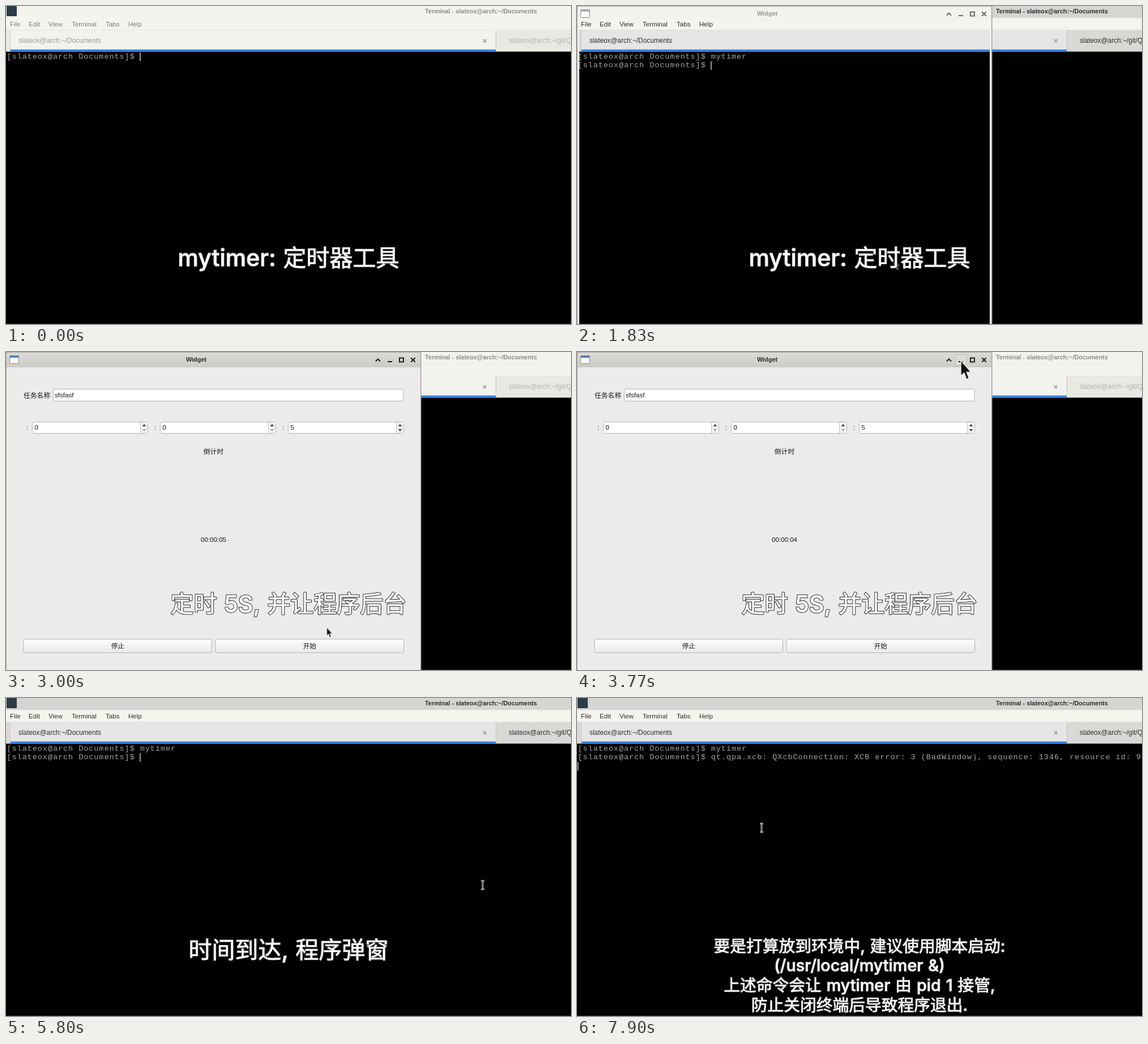
Write an HTML page with a canvas that moves like this. It is 998 by 561 pixels and loops after 8 s.

```html
<!DOCTYPE html>
<html lang="zh">
<head>
<meta charset="utf-8">
<title>mytimer</title>
<style>
  html, body { margin: 0; height: 100%; overflow: hidden; background: #000; }
  canvas { display: block; }
</style>
</head>
<body>
<canvas id="stage" width="998" height="561"></canvas>
<script>
const ctx = document.getElementById('stage').getContext('2d');
const LOOP = 8000;
const UI = '"Liberation Sans", "Noto Sans CJK SC", sans-serif';
const MONO = '13.6px "Liberation Mono", monospace';
const CAPTION = 'Inter, "Noto Sans CJK SC", sans-serif';
const USER = 'slateox@arch';
const PROMPT = '[' + USER + ' Documents]$ ';
const CELL = 9.05, ROW = 15.4;
const ERROR = 'qt.qpa.xcb: QXcbConnection: XCB error: 3 (BadWindow), sequence: 1346, resource id: 9';

// Moments at which the scene switches, in ms
const AT = { focus: 400, enter: 1720, shell: 1790, body: 1900, start: 2880, tick: 3500,
  minimize: 4060, popup: 5830, close: 6900 };

const CAPTIONS = [
  [0, 41, ['mytimer: 定时器工具']],
  [1950, 41, ['定时 5S, 并让程序后台']],
  [5200, 41, ['时间到达, 程序弹窗']],
  [6950, 28.75, ['要是打算放到环境中, 建议使用脚本启动:', '(/usr/local/mytimer &)',
    '上述命令会让 mytimer 由 pid 1 接管,', '防止关闭终端后导致程序退出.']]
];

// Pointer way points: time, x, y
const PATH = [
  [1770, 560, 448], [1950, 560, 448], [2400, 566, 380], [2500, 566, 380], [2800, 560, 515],
  [2950, 560, 515], [3300, 678, 15], [4080, 678, 15], [4400, 463, 276], [4550, 463, 276],
  [5500, 830, 310], [5800, 842, 330], [6300, 905, 497], [6950, 905, 497],
  [7500, 820, 440], [7880, 326, 229], [8000, 326, 229]
];

function rect(x, y, w, h, fill) {
  ctx.fillStyle = fill;
  ctx.fillRect(x, y, w, h);
}

function box(x, y, w, h, fill, stroke, radius = 3) {
  ctx.beginPath();
  ctx.roundRect(x, y, w, h, radius);
  ctx.fillStyle = fill;
  ctx.fill();
  ctx.lineWidth = 1;
  ctx.strokeStyle = stroke;
  ctx.stroke();
}

function text(str, x, y, { size = 11.6, weight = 500, color = '#161616', align = 'left' } = {}) {
  ctx.font = `${weight} ${size}px ${UI}`;
  ctx.textAlign = align;
  ctx.fillStyle = color;
  ctx.fillText(str, x, y + size * 0.35);
}

function line(points, color, width) {
  ctx.beginPath();
  points.forEach(([x, y]) => ctx.lineTo(x, y));
  ctx.strokeStyle = color;
  ctx.lineWidth = width;
  ctx.stroke();
}

function polygon(points, fill) {
  ctx.beginPath();
  points.forEach(([x, y]) => ctx.lineTo(x, y));
  ctx.closePath();
  ctx.fillStyle = fill;
  ctx.fill();
}

function vertical(y0, y1, top, bottom) {
  const g = ctx.createLinearGradient(0, y0, 0, y1);
  g.addColorStop(0, top);
  g.addColorStop(1, bottom);
  return g;
}

function cross(x, y, r, color, width) {
  line([[x - r, y - r], [x + r, y + r]], color, width);
  line([[x + r, y - r], [x - r, y + r]], color, width);
}

// Characters typed so far
const typed = (str, t, from, to) =>
  str.slice(0, Math.max(0, Math.ceil((t - from) / (to - from) * str.length)));

function terminalRow(str, row) {
  ctx.font = MONO;
  ctx.letterSpacing = '0.89px';
  ctx.textAlign = 'left';
  ctx.fillStyle = '#a4a4a4';
  ctx.fillText(str, 1.5, 92.8 + row * ROW);
  ctx.letterSpacing = '0px';
}

function terminal(t, active) {
  const ink = active ? '#2e2e2e' : '#9c9c9b';
  rect(0, 0, 998, 561, '#000');
  rect(0, 0, 998, 21, active ? '#d7d5d3' : '#f3f2ed');
  rect(0, 21, 998, 21, '#f4f3ed');
  rect(0, 42, 998, 38.5, active ? '#dad8d5' : '#e9e8e2');
  rect(8, 43, 857, 34, active ? '#e6e5e6' : '#f2f2ef');
  rect(0, 42, 998, 1, active ? '#dedcd9' : '#e4e3df');
  rect(7, 43, 1, 37, '#cccac7');
  rect(865, 43, 1, 37, '#c6c4c1');
  rect(8, 76.7, 857, 3.6, '#3580dc');
  rect(1, 0, 18, 18, '#2f3b47');
  text(`Terminal - ${USER}:~/Documents`, 740, 9, { size: 10.9, weight: 700, color: active ? ink : '#8d8d8c' });
  [['File', 7], ['Edit', 40], ['View', 75], ['Terminal', 116], ['Tabs', 176], ['Help', 216]]
    .forEach(([label, x]) => text(label, x, 32, { color: active ? ink : '#7d7d7c' }));
  text(`${USER}:~/Documents`, 22, 61, { size: 11.85, color: ink });
  text(`${USER}:~/git/Q`, 888, 61, { size: 11.85, color: active ? ink : '#b3b2ae' });
  cross(845.5, 61.5, 2.8, '#a3a3a2', 1.8);

  const command = typed('mytimer', t, 900, 1600);
  const row = t < AT.enter ? 0 : t < AT.close ? 1 : 2;
  terminalRow(PROMPT + command, 0);
  if (row > 0) terminalRow(PROMPT + (row > 1 ? ERROR : ''), 1);
  const column = row === 0 ? PROMPT.length + command.length : row === 1 ? PROMPT.length : 0;
  rect(1 + column * CELL, 82 + row * ROW, 1.4, 15, '#d6d6d6');
  rect(0, 560, 998, 1, '#222');
}

function titleBar(x, y, w) {
  ctx.beginPath();
  ctx.roundRect(x, y, w, 27, [5, 5, 0, 0]);
  ctx.fillStyle = vertical(y, y + 27, '#dddbd9', '#cdcbc7');
  ctx.fill();
}

function windowButtons(active, hover) {
  const ink = active ? '#1f1f1f' : '#686868';
  if (hover) box(668.5, 4.5, 19, 19, '#dedcda', '#bcbab7', 2);
  line([[653, 16.5], [657, 12.5], [661, 16.5]], ink, 2);
  rect(674, 16, 8, 2, ink);
  ctx.strokeRect(695, 10.5, 7, 7);
  cross(719, 14, 3.8, ink, 2);
}

function spinBox(x, w, value, focused) {
  text(':', x - 8.5, 133, { align: 'center' });
  box(x + .5, 123.5, w, 20, '#fff', focused ? '#3c80cc' : '#b6b4b1');
  const split = x + w - 13;
  rect(split, 124, 1, 19, focused ? '#8cb0da' : '#c2c0bd');
  rect(split + 1, 124, 12, 19, '#f4f3f2');
  const mid = split + 7;
  polygon([[mid - 3.5, 131], [mid, 127], [mid + 3.5, 131]], '#444');
  polygon([[mid - 3.5, 136], [mid, 140], [mid + 3.5, 136]], value === '0' ? '#aaa' : '#444');
  text(value, x + 4.5, 133);
  if (focused && value === '5') rect(x + 11.5, 126, 1, 15, '#222');
}

function button(label, x, y, w, h) {
  box(x, y, w, h, vertical(y, y + h, '#fdfdfd', '#eae9e8'), '#b3b1ae');
  text(label, x + w / 2, y + h / 2, { align: 'center' });
}

function widget(t) {
  const painted = t >= AT.body;
  if (painted) {
    rect(0, 20, 733, 541, '#ecebea');
    titleBar(0, 0, 733);
  } else {
    rect(0, 0, 733, 23, '#f3f2ed');
    rect(0, 0, 4, 561, '#f0efec');
    rect(729, 0, 4, 561, '#f0efec');
  }
  rect(0, 0, 733, 1, '#a5a3a0');
  rect(0, 0, 1, 561, '#b0aeab');
  rect(732, 0, 1.5, 561, '#a5a3a0');
  box(6.5, 6.5, 16, 14, '#f9f9f9', '#8a8a88', 1);
  rect(7, 7, 15, 3, painted ? '#4d7ab8' : '#a5b3c4');
  text('Widget', 336, 13.5, { size: 10.9, weight: 700, color: painted ? '#2b2b2b' : '#999', align: 'center' });
  windowButtons(painted, t >= 3300);
  if (!painted) return;

  text('任务名称', 31, 76.5, { size: 11.8 });
  box(83.5, 65.5, 618.5, 21, '#fff', '#b6b4b1');
  text(typed('sfsfasf', t, 1980, 2200), 86, 75.5);
  spinBox(46, 204, '0', false);
  spinBox(272, 204, '0', false);
  spinBox(498, 204, t < 2320 ? '0' : '5', t >= 2260 && t < AT.start);
  text('倒计时', 366.5, 175.5, { size: 11.8, align: 'center' });
  const seconds = t < AT.start ? 0 : t < AT.tick ? 5 : 4;
  text('00:00:0' + seconds, 366.5, 330.5, { align: 'center' });
  button('停止', 31, 506.5, 332.5, 24);
  button('开始', 370, 506.5, 332.5, 24);
}

function popup() {
  rect(708, 436, 262, 80, '#ecebea');
  titleBar(708, 428, 262);
  cross(956, 442, 3.8, '#1f1f1f', 2);
  text('sfsfasf', 839, 469, { align: 'center' });
  button('OK', 880, 486, 80, 23);
}

function pointerAt(t) {
  const i = PATH.findIndex(p => p[0] > t);
  if (i < 1) return null;
  const [t0, x0, y0] = PATH[i - 1], [t1, x1, y1] = PATH[i];
  const u = (t - t0) / (t1 - t0), k = u * u * (3 - 2 * u);
  return [x0 + (x1 - x0) * k, y0 + (y1 - y0) * k];
}

function arrow(x, y, scale) {
  ctx.save();
  ctx.translate(x, y);
  ctx.scale(scale, scale);
  polygon([[0, 0], [0, 14], [3, 11.2], [5.2, 17], [7.4, 16], [5.2, 10.5], [9, 10.3]], '#111');
  ctx.lineWidth = 0.7;
  ctx.strokeStyle = '#eee';
  ctx.stroke();
  ctx.restore();
}

function beam(x, y) {
  for (const [color, width] of [['#e4e4e4', 2.8], ['#111', 0.9]]) {
    line([[x, y - 7], [x, y + 7]], color, width);
    for (const end of [-7.5, 7.5]) line([[x - 3, y + end], [x + 3, y + end]], color, width - 0.4);
  }
}

function pointer(t, widgetOpen, popupOpen) {
  const p = pointerAt(t);
  if (!p) return;
  const [x, y] = p;
  const overPopup = popupOpen && x > 708 && x < 970 && y > 428;
  if (widgetOpen || overPopup || y < 80) arrow(x, y, y < 27 ? 1.95 : 1);
  else beam(x, y);
}

function caption(t) {
  const [, size, lines] = CAPTIONS.filter(c => c[0] <= t).pop();
  ctx.font = `500 ${size}px ${CAPTION}`;
  ctx.wordSpacing = `${size * 0.045}px`;
  ctx.textAlign = 'center';
  ctx.lineJoin = 'round';
  ctx.fillStyle = '#fff';
  const firstY = lines.length > 1 ? 447.5 : 459;
  lines.forEach((str, i) => {
    const y = firstY + i * 34.7;
    // dark outline, then a hairline that fattens the white letters
    for (const [color, width] of [['#2a2a2a', 2.6], ['#fff', 0.6]]) {
      ctx.strokeStyle = color;
      ctx.lineWidth = width;
      ctx.strokeText(str, 499, y);
    }
    ctx.fillText(str, 499, y);
  });
  ctx.wordSpacing = '0px';
  ctx.lineJoin = 'miter';
}

function draw(t) {
  const widgetOpen = t >= AT.shell && t < AT.minimize;
  const popupOpen = t >= AT.popup && t < AT.close;
  const active = t >= AT.focus && !popupOpen && !(widgetOpen && t >= AT.body);
  terminal(t, active);
  if (widgetOpen) widget(t);
  if (popupOpen) popup();
  pointer(t, widgetOpen, popupOpen);
  caption(t);
}

const begin = performance.now();
function tick() {
  draw((performance.now() - begin) % LOOP);
  requestAnimationFrame(tick);
}
tick();
</script>
</body>
</html>
```
